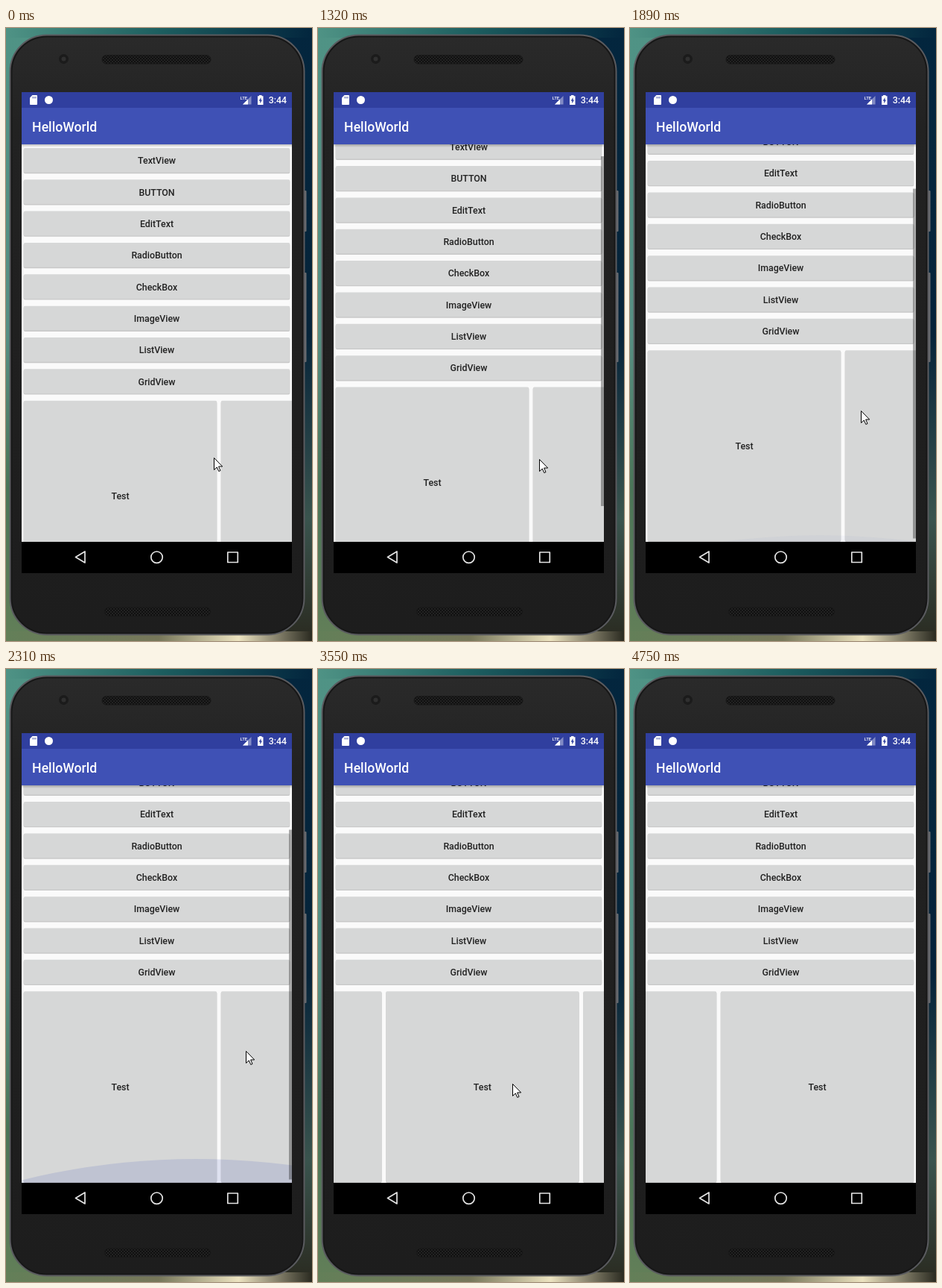
Write an HTML page that moves like this. It is 411 by 822 pixels and loops after 5000 ms.

```html
<!DOCTYPE html>
<html lang="en">
<head>
<meta charset="utf-8">
<title>HelloWorld</title>
<style>
html, body { margin: 0; width: 100%; height: 100%; overflow: hidden; background: #123; }
svg { display: block; width: 100%; height: 100%; }
text { font-family: Roboto, "Open Sans", sans-serif; font-weight: 500; }
.label { font-size: 12.36px; fill: #222; text-anchor: middle; }
.btn { fill: #d6d7d7; }
.shade { fill: #000; opacity: .2; }
</style>
</head>
<body>
<svg viewBox="0 0 411 822">
  <defs>
    <linearGradient id="leftSky" x2="0" y2="1">
      <stop offset="0" stop-color="#4f9385"/>
      <stop offset=".5" stop-color="#568f83"/>
      <stop offset=".75" stop-color="#4a7558"/>
      <stop offset="1" stop-color="#637f58"/>
    </linearGradient>
    <linearGradient id="rightSky" x2="0" y2="1">
      <stop offset="0" stop-color="#03263e"/>
      <stop offset=".5" stop-color="#06243a"/>
      <stop offset=".8" stop-color="#3a544e"/>
      <stop offset="1" stop-color="#2a2a20"/>
    </linearGradient>
    <linearGradient id="topSky">
      <stop offset="0" stop-color="#4f9385"/>
      <stop offset=".5" stop-color="#1d5f60"/>
      <stop offset="1" stop-color="#03263e"/>
    </linearGradient>
    <linearGradient id="floor">
      <stop offset="0" stop-color="#637f58"/>
      <stop offset=".5" stop-color="#77775a"/>
      <stop offset=".76" stop-color="#ece3c0"/>
      <stop offset="1" stop-color="#2a2a20"/>
    </linearGradient>
    <linearGradient id="face" x2="0" y2="1">
      <stop offset="0" stop-color="#2a2a2a"/>
      <stop offset=".15" stop-color="#222"/>
      <stop offset="1" stop-color="#1d1d1d"/>
    </linearGradient>
    <linearGradient id="barShade" x2="0" y2="1">
      <stop offset="0" stop-color="#000" stop-opacity=".24"/>
      <stop offset="1" stop-color="#000" stop-opacity="0"/>
    </linearGradient>
    <pattern id="mesh" width="4" height="4" patternUnits="userSpaceOnUse">
      <rect width="4" height="4" fill="#222"/>
      <circle cx="1" cy="1" r="1" fill="#0a0a0a"/>
      <circle cx="3" cy="3" r="1" fill="#0a0a0a"/>
    </pattern>
    <clipPath id="view"><rect x="21" y="156" width="363" height="533"/></clipPath>
  </defs>

  <rect width="206" height="822" fill="url(#leftSky)"/>
  <rect x="206" width="205" height="822" fill="url(#rightSky)"/>
  <rect width="411" height="13" fill="url(#topSky)"/>
  <rect y="809" width="411" height="13" fill="url(#floor)"/>

  <g fill="#6a6c70">
    <rect x="399" y="218" width="4.5" height="55" rx="1"/>
    <rect x="399" y="328" width="4.5" height="120" rx="1"/>
  </g>
  <rect x="5.500" y="9.500" width="395" height="804" rx="49" fill="#171717" stroke="#5a5b5f" stroke-width="2"/>
  <rect x="8.500" y="12.500" width="389" height="798" rx="46" fill="url(#face)"/>
  <circle cx="77.500" cy="41.500" r="6.500" fill="#1b1b1b"/>
  <circle cx="77.500" cy="41.500" r="3" fill="#303030"/>
  <rect x="129" y="36.500" width="146" height="11.500" rx="5.700" fill="url(#mesh)" stroke="#181818"/>
  <rect x="132.500" y="777" width="142" height="11.500" rx="5.700" fill="url(#mesh)" stroke="#181818"/>

  <rect x="21" y="156" width="363" height="533" fill="#fafafa"/>
  <g clip-path="url(#view)">
    <g id="list"></g>
    <circle id="glow" cx="255" r="978" fill="#3f51b5"/>
    <path id="sideGlow" d="M384 427Q377 560 384 690Z" fill="#3f51b5"/>
    <rect id="thumb" x="380" width="4" height="469"/>
    <rect x="21" y="156" width="363" height="4" fill="url(#barShade)"/>
  </g>

  <rect x="21" y="86" width="363" height="21.500" fill="#303f9f"/>
  <rect x="21" y="107" width="363" height="49" fill="#3f51b5"/>
  <text x="35.100" y="138.500" font-size="17.660" fill="#fff">HelloWorld</text>
  <g fill="#fff">
    <path d="M35.500 90H41Q42 90 42 91V102Q42 103 41 103H33Q32 103 32 102V93.500Z"/>
    <path d="M36 92v2.500M38 92v2.500M40 92v2.500" stroke="#303f9f" stroke-width=".8"/>
    <circle cx="57.500" cy="96.500" r="5.500"/>
    <text x="314.500" y="95.500" font-size="6">LTE</text>
    <path d="M329.500 91V102.500H318Z" opacity=".4"/>
    <path d="M325 95.500V102.500H318Z"/>
    <path d="M340 91.300V90H343.500V91.300H345.500V103H338V91.300Z"/>
    <path d="M342.500 93L339.700 97.800H341.300V101.300L344 96.500H342.500Z" fill="#303f9f"/>
    <text x="377" y="101" font-size="12.360" text-anchor="end">3:44</text>
  </g>

  <rect x="21" y="689" width="363" height="42"/>
  <g fill="none" stroke="#e4e4e4" stroke-width="1.700" stroke-linejoin="round">
    <path d="M93.500 709.500L106 702V717Z"/>
    <circle cx="202.500" cy="709.700" r="7.700"/>
    <rect x="297.800" y="703" width="13.500" height="13.500"/>
  </g>
  <path id="cursor" d="M.5 .5V16.500L4.300 13 6.800 18.500 9 17.500 6.600 12H11.700Z" fill="#fff" stroke="#000"/>
</svg>
<script>
const LOOP = 5000, START = 1170, STEP = 139;
const TOP = 156, ROW = 42.35, CARD = 265;
const $ = id => document.getElementById(id);
const set = (id, attrs) => {
  for (const key in attrs) $(id).setAttribute(key, attrs[key]);
};

// 0 before a, 1 after b; a power above 1 starts slowly.
const ramp = (k, a, b, power = 1) =>
  Math.min(1, Math.max(0, (k - a) / (b - a))) ** power;

// Mouse stops: step, x, y.
const stops = [[-7, 279, 576], [-2, 296, 610], [0, 295, 594], [3, 301, 546],
  [6, 314, 496], [8, 322, 512], [10, 352, 530], [13, 288, 533], [16, 330, 545],
  [20, 54, 588], [21, 115, 578], [23, 54, 588]];

function mouse(k) {
  let [, x, y] = stops[0];
  for (let i = 1; i < stops.length; i++) {
    const u = ramp(k, stops[i - 1][0], stops[i][0]);
    x += (stops[i][1] - x) * u;
    y += (stops[i][2] - y) * u;
  }
  return `translate(${Math.round(x)} ${Math.round(y)})`;
}

function button(x, y, w, h, label) {
  const box = `x="${x + 2.7}" width="${w - 5.4}" rx="2"`;
  return `<rect class="shade" ${box} y="${y + 6}" height="${h - 9.2}"/>` +
    `<rect class="btn" ${box} y="${y + 4.9}" height="${h - 9.5}"/>` +
    `<text class="label" x="${x + w / 2}" y="${y + h / 2 + 5}">${label}</text>`;
}

const names = ["TextView", "BUTTON", "EditText", "RadioButton", "CheckBox",
  "ImageView", "ListView", "GridView"];
const cards = [0, 1, 2].map(i =>
  button(21 + i * CARD, TOP + names.length * ROW, CARD, CARD, "Test"));
$("list").innerHTML =
  names.map((name, i) => button(21, TOP + i * ROW, 363, ROW, name)).join("") +
  `<g id="cards">${cards.join("")}</g>`;

function draw(now) {
  // The screen refreshes in even steps, counted from the first drag.
  const k = Math.floor((now % LOOP - START) / STEP);
  const scroll = 40 * ramp(k, 0, 2.2) + 27.5 * ramp(k, 3, 4);
  const pan = 220 * ramp(k, 10, 13, 3) - 38 * ramp(k, 14, 16) + 250 * ramp(k, 16, 20, 2);
  const pull = ramp(k, 4, 8) * (1 - ramp(k, 8, 11));

  set("list", { transform: `translate(0 ${-scroll})` });
  set("cards", { transform: `translate(${-pan} 0)` });
  set("thumb", {
    y: TOP + scroll * .882,
    opacity: .32 * ramp(k, 0, 1) * (1 - ramp(k, 11, 13))
  });
  set("glow", { cy: 688 - 31 * pull + 978, opacity: .15 * pull });
  set("sideGlow", { opacity: .14 * ramp(k, 19, 20) * (1 - ramp(k, 20, 25)) });
  set("cursor", { transform: mouse(k), visibility: k < 25 ? "visible" : "hidden" });
}

function tick() {
  draw(performance.now());
  requestAnimationFrame(tick);
}
tick();
</script>
</body>
</html>
```
